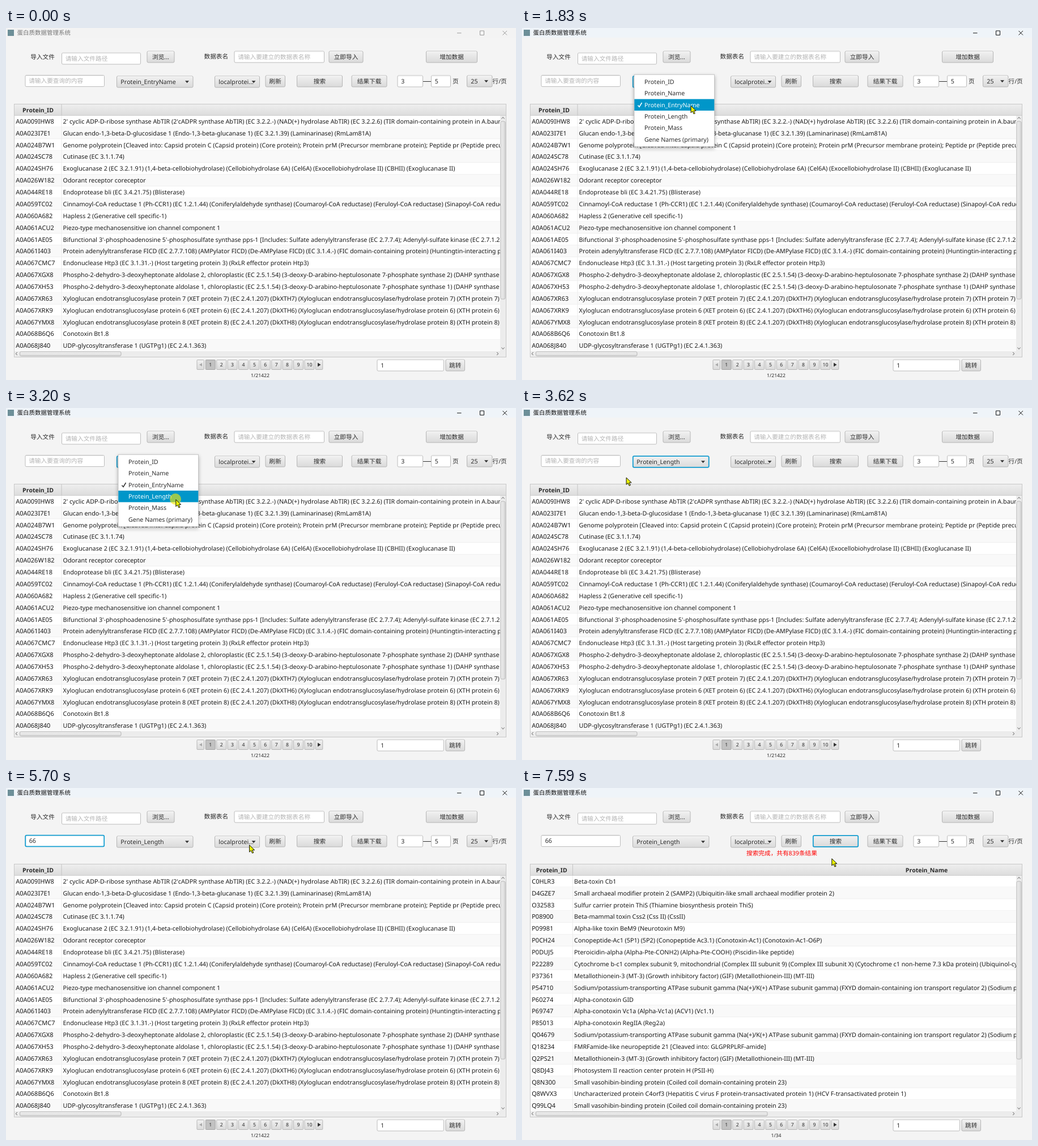
An HTML page that plays this animation: 900 by 622 pixels, repeating every 7990 ms.

```html
<!DOCTYPE html>
<html lang="zh-CN">
<head>
<meta charset="utf-8">
<title>蛋白质数据管理系统</title>
<style>
html, body { margin: 0; width: 100%; height: 100%; overflow: hidden; background: #f4f4f4; }
svg { display: block; width: 900px; height: 622px; }
text {
  font: 10.67px "Noto Sans", "Noto Sans CJK SC", sans-serif; fill: #2b2b2b; white-space: pre;
  font-kerning: none; text-rendering: geometricPrecision;
}
.cell { font-size: 10.76px; fill: #1a1a1a; }
.id { font-size: 11px; }
.head { font-weight: 700; font-size: 10.5px; }
.prompt { fill: #b4b4b4; }
.small { font-size: 8.7px; }
.red { fill: #f00; }
.mid { text-anchor: middle; }
.btn { fill: url(#face); stroke: #b5b5b5; }
.field { fill: #fff; stroke: #bcbcbc; }
.ring { fill: none; stroke: #169fd2; stroke-width: 1.8; }
#popup > .box { fill: #fff; stroke: #c6c6c6; filter: drop-shadow(0 3px 3px rgba(0,0,0,.3)); }
</style>
</head>
<body>
<svg id="stage" viewBox="0 0 900 622" xmlns="http://www.w3.org/2000/svg">
  <defs>
    <linearGradient id="face" x2="0" y2="1"><stop stop-color="#f1f1f1"/><stop offset="1" stop-color="#dadada"/></linearGradient>
    <linearGradient id="bar" x2="0" y2="1"><stop stop-color="#eee"/><stop offset="1" stop-color="#dcdcdc"/></linearGradient>
    <linearGradient id="thumbV"><stop stop-color="#ededed"/><stop offset="1" stop-color="#d9d9d9"/></linearGradient>
    <clipPath id="view"><path d="M14.5 155H872V570.5H14.5z"/></clipPath>
  </defs>
</svg>
<script>
const LOOP = 7990, TICK = 67.6, ROW = 20.87, ITEM = 20.4, ITEM_TOP = 84.8;
const stage = document.getElementById('stage');

function el(tag, attrs, parent = stage) {
  const node = document.createElementNS(stage.namespaceURI, tag);
  for (const k in attrs) node.setAttribute(k, attrs[k]);
  return parent.appendChild(node);
}
const group = (parent, attrs = {}) => el('g', attrs, parent);
const rect = (x, y, x2, y2, attrs, parent) =>
  el('rect', { x, y, width: x2 - x, height: y2 - y, ...attrs }, parent);
const shape = (d, fill, parent) => el('path', { d, fill }, parent);
const line = (d, stroke, parent) => el('path', { d, stroke, fill: 'none' }, parent);
function text(str, x, cy, cls = '', parent) {
  const node = el('text', { x, y: cy + 3.8, class: cls }, parent);
  node.textContent = str;
  return node;
}
const show = (node, on) => { node.style.display = on ? '' : 'none'; };

function button(x, y, x2, label) {
  const box = rect(x + .5, y, x2 - .5, y + 20, { rx: 2, class: 'btn' });
  line(`M${x + 2} ${y + 1}H${x2 - 2}`, '#fafafa');
  text(label, (x + x2) / 2, y + 10, 'mid');
  return box;
}
function combo(x, y, x2, label) {
  rect(x + .5, y, x2 - .5, y + 20, { rx: 2, class: 'btn' });
  line(`M${x + 2} ${y + 1}H${x2 - 2}`, '#fafafa');
  shape(`M${x2 - 14.5} ${y + 8.2}h7l-3.5 4z`, '#333');
  return text(label, x + 7.3, y + 10);
}
function field(x, y, x2, label, cls) {
  rect(x + .5, y, x2 - .5, y + 20, { rx: 2, class: 'field' });
  line(`M${x + 1.5} ${y + 1}H${x2 - 1.5}`, '#eee');
  return text(label, x + 6.7, y + 10, cls);
}
const ring = (x, y, x2) => rect(x + .8, y + .2, x2 - .8, y + 19.8, { rx: 2, class: 'ring' });

// Title bar
const bar = rect(0, 0, 900, 17, {});
rect(3, 3, 14, 14, { fill: '#6d8f98' });
const title = text('蛋白质数据管理系统', 19.5, 8.5);
title.style.fontSize = '10.5px';
const winIcons = line('M796 8.9h7.5M836.5 5h7v7.5h-7zM876.5 5l7.5 7.5M884 5l-7.5 7.5', '#000');

// Import row
text('导入文件', 43.3, 51);
field(98, 44, 238, '请输入文件路径', 'prompt');
button(248.5, 41, 297.5, '浏览...');
text('数据表名', 349.5, 50.5);
field(402.5, 41, 562, '请输入要建立的数据表名称', 'prompt');
button(569.5, 41, 630.5, '立即导入');
button(741, 41, 832, '增加数据');

// Search row
const prompt = field(33.5, 83.5, 174, '请输入要查询的内容', 'prompt');
const typed = text('', 40.7, 93.5);
const caret = rect(0, 87, 1, 100.5, { fill: '#111' });
const choice = combo(195, 85, 330.5, 'Protein_EntryName');
combo(368, 85, 448, 'localprotei...');
button(457.5, 84, 493, '刷新');
const search = button(513, 84, 594, '搜索');
button(609.5, 84, 672.5, '结果下载');
field(690.5, 84, 736, '3');
line('M736 94.5H750', '#333');
field(750, 84, 785, '5');
text('页', 788, 94);
combo(813, 84, 858.5, '25');
text('行/页', 858.5, 94);
const rings = { input: ring(33.5, 83.5, 174), combo: ring(195, 85, 330.5), search: ring(513, 84, 594) };
const message = text('搜索完成，共有839条结果', 396, 115.5, 'red');

// Table
rect(14.5, 134.5, 882.5, 581.5, { fill: '#fff', stroke: '#c8c8c8' });
rect(15, 135, 882, 155, { fill: 'url(#bar)' });
line('M15 154.5H882', '#cdcdcd');
const stripes = group(stage, { 'clip-path': 'url(#view)' });
for (let i = 0; i < 20; i++) {
  const y = 154.6 + i * ROW;
  if (i % 2) rect(15, y, 872, y + ROW, { fill: '#f9f9f9' }, stripes);
  rect(15, y + ROW - 1, 872, y + ROW, { fill: '#f0f0f0' }, stripes);
}

function table(split, thumbEnd, pages, rows) {
  const g = group(), body = group(g, { 'clip-path': 'url(#view)' });
  text('Protein_ID', (15 + split) / 2, 145, 'head mid', g);
  line(`M${split} 135V155`, '#c4c4c4', g);
  line(`M${split} 155V571`, '#ececec', body);
  rows.trim().split('\n').forEach((row, i) => {
    const cut = row.indexOf(' '), cy = 165 + i * ROW;
    text(row.slice(0, cut), 17.2, cy, 'cell id', body);
    text(row.slice(cut + 1), split + 2.6, cy, 'cell', body);
  });
  rect(15, 571, 872, 581, { fill: '#ececec' }, g);
  rect(24.5, 572, thumbEnd, 579.5, { rx: 2, class: 'btn' }, g);
  text(pages, 448.5, 613, 'mid small', g);
  return g;
}

const before = table(98, 203, '1/21422', `
A0A009IHW8 2' cyclic ADP-D-ribose synthase AbTIR (2'cADPR synthase AbTIR) (EC 3.2.2.-) (NAD(+) hydrolase AbTIR) (EC 3.2.2.6) (TIR domain-containing protein in A.baumannii)
A0A023I7E1 Glucan endo-1,3-beta-D-glucosidase 1 (Endo-1,3-beta-glucanase 1) (EC 3.2.1.39) (Laminarinase) (RmLam81A)
A0A024B7W1 Genome polyprotein [Cleaved into: Capsid protein C (Capsid protein) (Core protein); Protein prM (Precursor membrane protein); Peptide pr (Peptide precursor)
A0A024SC78 Cutinase (EC 3.1.1.74)
A0A024SH76 Exoglucanase 2 (EC 3.2.1.91) (1,4-beta-cellobiohydrolase) (Cellobiohydrolase 6A) (Cel6A) (Exocellobiohydrolase II) (CBHII) (Exoglucanase II)
A0A026W182 Odorant receptor coreceptor
A0A044RE18 Endoprotease bli (EC 3.4.21.75) (Blisterase)
A0A059TC02 Cinnamoyl-CoA reductase 1 (Ph-CCR1) (EC 1.2.1.44) (Coniferylaldehyde synthase) (Coumaroyl-CoA reductase) (Feruloyl-CoA reductase) (Sinapoyl-CoA reductase)
A0A060A682 Hapless 2 (Generative cell specific-1)
A0A061ACU2 Piezo-type mechanosensitive ion channel component 1
A0A061AE05 Bifunctional 3'-phosphoadenosine 5'-phosphosulfate synthase pps-1 [Includes: Sulfate adenylyltransferase (EC 2.7.7.4); Adenylyl-sulfate kinase (EC 2.7.1.25)]
A0A061I403 Protein adenylyltransferase FICD (EC 2.7.7.108) (AMPylator FICD) (De-AMPylase FICD) (EC 3.1.4.-) (FIC domain-containing protein) (Huntingtin-interacting protein E)
A0A067CMC7 Endonuclease Htp3 (EC 3.1.31.-) (Host targeting protein 3) (RxLR effector protein Htp3)
A0A067XGX8 Phospho-2-dehydro-3-deoxyheptonate aldolase 2, chloroplastic (EC 2.5.1.54) (3-deoxy-D-arabino-heptulosonate 7-phosphate synthase 2) (DAHP synthase 2)
A0A067XH53 Phospho-2-dehydro-3-deoxyheptonate aldolase 1, chloroplastic (EC 2.5.1.54) (3-deoxy-D-arabino-heptulosonate 7-phosphate synthase 1) (DAHP synthase 1)
A0A067XR63 Xyloglucan endotransglucosylase protein 7 (XET protein 7) (EC 2.4.1.207) (DkXTH7) (Xyloglucan endotransglucosylase/hydrolase protein 7) (XTH protein 7)
A0A067XRK9 Xyloglucan endotransglucosylase protein 6 (XET protein 6) (EC 2.4.1.207) (DkXTH6) (Xyloglucan endotransglucosylase/hydrolase protein 6) (XTH protein 6)
A0A067YMX8 Xyloglucan endotransglucosylase protein 8 (XET protein 8) (EC 2.4.1.207) (DkXTH8) (Xyloglucan endotransglucosylase/hydrolase protein 8) (XTH protein 8)
A0A068B6Q6 Conotoxin Bt1.8
A0A068J840 UDP-glycosyltransferase 1 (UGTPg1) (EC 2.4.1.363)`);

const after = table(89.5, 433, '1/34', `
C0HLR3 Beta-toxin Cb1
D4GZE7 Small archaeal modifier protein 2 (SAMP2) (Ubiquitin-like small archaeal modifier protein 2)
O32583 Sulfur carrier protein ThiS (Thiamine biosynthesis protein ThiS)
P08900 Beta-mammal toxin Css2 (Css II) (CssII)
P09981 Alpha-like toxin BeM9 (Neurotoxin M9)
P0CH24 Conopeptide-Ac1 (5P1) (5P2) (Conopeptide Ac3.1) (Conotoxin-Ac1) (Conotoxin-Ac1-O6P)
P0DUJ5 Pteroicidin-alpha (Alpha-Pte-CONH2) (Alpha-Pte-COOH) (Piscidin-like peptide)
P22289 Cytochrome b-c1 complex subunit 9, mitochondrial (Complex III subunit 9) (Complex III subunit X) (Cytochrome c1 non-heme 7.3 kDa protein) (Ubiquinol-cytochrome c)
P37361 Metallothionein-3 (MT-3) (Growth inhibitory factor) (GIF) (Metallothionein-III) (MT-III)
P54710 Sodium/potassium-transporting ATPase subunit gamma (Na(+)/K(+) ATPase subunit gamma) (FXYD domain-containing ion transport regulator 2) (Sodium pump gamma)
P60274 Alpha-conotoxin GID
P69747 Alpha-conotoxin Vc1a (Alpha-Vc1a) (ACV1) (Vc1.1)
P85013 Alpha-conotoxin RegIIA (Reg2a)
Q04679 Sodium/potassium-transporting ATPase subunit gamma (Na(+)/K(+) ATPase subunit gamma) (FXYD domain-containing ion transport regulator 2) (Sodium pump gamma)
Q18234 FMRFamide-like neuropeptide 21 [Cleaved into: GLGPRPLRF-amide]
Q2PS21 Metallothionein-3 (MT-3) (Growth inhibitory factor) (GIF) (Metallothionein-III) (MT-III)
Q8DJ43 Photosystem II reaction center protein H (PSII-H)
Q8N300 Small vasohibin-binding protein (Coiled coil domain-containing protein 23)
Q8WVX3 Uncharacterized protein C4orf3 (Hepatitis C virus F protein-transactivated protein 1) (HCV F-transactivated protein 1)
Q99LQ4 Small vasohibin-binding protein (Coiled coil domain-containing protein 23)`);
text('Protein_Name', 714, 145, 'head mid', after);

// Scroll bars
rect(872, 155, 882, 581, { fill: '#ececec' });
rect(873, 165, 881, 479, { rx: 2, fill: 'url(#thumbV)', stroke: '#b9b9b9' });
line('M874.5 160.5l2.5-3 2.5 3M874.5 564.5l2.5 3 2.5-3M20 573l-3 2.5 3 2.5M866 573l3 2.5-3 2.5', '#666');

// Pagination
function pageButton(x, x2, label, current) {
  rect(x + .5, 586.5, x2 - .5, 603.5, current
    ? { rx: 1, fill: '#c2c2c2', stroke: '#a2a2a2' } : { rx: 1, class: 'btn' });
  if (label) text(label, (x + x2) / 2, 594.5, 'mid small');
}
pageButton(336.5, 350);
shape('M346 592v6l-5-3z', '#aaa');
for (let i = 0; i < 10; i++) pageButton(351.8 + i * 19.4, 369.8 + i * 19.4, i + 1, !i);
pageButton(545.8, 559.3);
shape('M550 591.5v7l5.5-3.5z', '#333');
field(654.5, 586, 773, '1');
button(775.5, 586, 810, '跳转');

// Drop-down list
const popup = group(stage, { id: 'popup' });
rect(198, 82.3, 339.5, 209.7, { class: 'box' }, popup);
const mark = rect(198.3, 0, 339.3, ITEM, { fill: '#0096c9' }, popup);
const items = ['Protein_ID', 'Protein_Name', 'Protein_EntryName', 'Protein_Length', 'Protein_Mass', 'Gene Names (primary)']
  .map((name, i) => text(name, 216, ITEM_TOP + (i + .5) * ITEM, '', popup));
const tick = el('path', { d: 'M204.5 136.5l2.5 3 4.5-7.5', fill: 'none', 'stroke-width': 1.5 }, popup);

// Pointer
const pointer = group();
const halo = el('circle', { r: 10, fill: '#ffea00', opacity: .6 }, pointer);
const arrow = el('path', {
  d: 'M.8 .8V13.1L3.7 10.5 5.9 15.2 8.1 14.2 5.9 9.7H9.9z', fill: '#eaf200', stroke: '#111', 'stroke-width': 1
}, pointer);
const beam = group(pointer);
for (const [stroke, width] of [['#111', 2.4], ['#8c8a10', .6]])
  el('path', { d: 'M-4 -6H4M-4 6.5H4M0 -6V6.5', stroke, 'stroke-width': width }, beam);

// time, x, y
const path = [
  [67, 552, 616], [1080, 295, 103], [1760, 295, 103], [1900, 300, 178], [2100, 300, 178],
  [2230, 300, 191], [2440, 300, 191], [2860, 299, 161], [3340, 299, 161], [3750, 117.3, 100],
  [5140, 117.3, 100], [5970, 552, 100], [6190, 552, 100], [6420, 546, 124]
];
function pointerAt(t) {
  const next = path.findIndex(p => p[0] > t);
  if (next < 1) return path[next ? path.length - 1 : 0].slice(1);
  const [t0, x0, y0] = path[next - 1], [t1, x1, y1] = path[next];
  const u = (t - t0) / (t1 - t0), k = u * u * (3 - 2 * u);
  return [x0 + (x1 - x0) * k, y0 + (y1 - y0) * k];
}

function draw(t) {
  const during = (...spans) => spans.some(([a, b]) => t >= a && t < b);

  const active = t >= 1150;
  bar.setAttribute('fill', active ? '#eff4f9' : '#f3f3f3');
  title.style.fill = active ? '#111' : '#777';
  winIcons.setAttribute('stroke', active ? '#111' : '#999');

  const [x, y] = pointerAt(Math.floor((t + 2) / TICK) * TICK);
  const overField = x > 34 && x < 174 && y > 83 && y < 104;
  show(pointer, t >= 70);
  pointer.setAttribute('transform', `translate(${x} ${y})`);
  show(halo, during([1150, 1360], [3200, 3340], [3820, 3890], [6050, 6190]));
  show(arrow, !overField);
  show(beam, overField);

  show(popup, during([1360, 3340]));
  const hover = t < 1430 ? -1 : Math.floor((y - ITEM_TOP) / ITEM);
  show(mark, hover >= 0);
  mark.setAttribute('y', ITEM_TOP + hover * ITEM);
  items.forEach((item, i) => { item.style.fill = i === hover ? '#fff' : ''; });
  tick.setAttribute('stroke', hover === 2 ? '#fff' : '#333');
  choice.textContent = t < 3340 ? 'Protein_EntryName' : 'Protein_Length';

  show(rings.combo, during([1150, 3820]));
  show(rings.input, during([3820, 6050]));
  show(rings.search, t >= 6050);
  search.style.fill = during([6050, 6190]) ? '#d2d2d2' : '';

  const count = (t >= 4550) + (t >= 4680);
  typed.textContent = '6'.repeat(count);
  show(prompt, t < 3820);
  show(caret, during([3820, 4350], [4550, 5210], [5740, 6050]));
  caret.setAttribute('x', 40.5 + count * 6.1);

  const done = t >= 7590;
  show(before, !done);
  show(after, done);
  show(message, done);
}

const start = performance.now();
function frame() {
  draw((performance.now() - start) % LOOP);
  requestAnimationFrame(frame);
}
frame();
</script>
</body>
</html>
```
